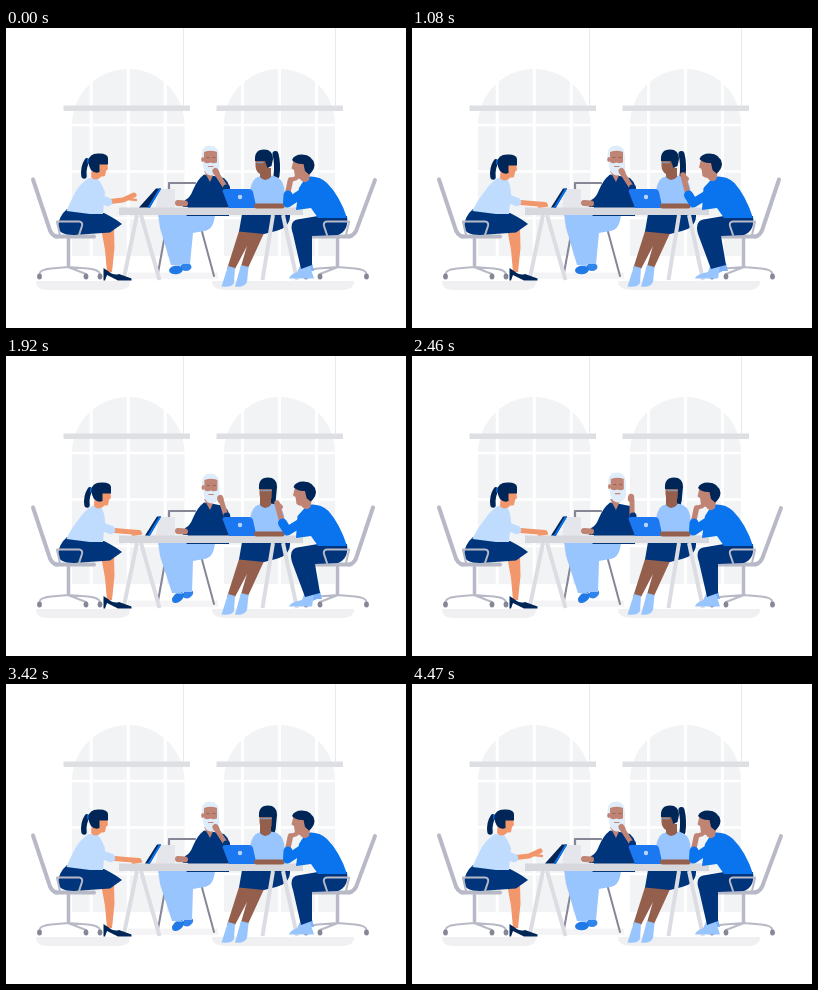
An HTML page with a canvas that plays this animation: 400x300 px, repeating every 4500 ms.

```html
<!DOCTYPE html>
<html lang="en">
<head>
<meta charset="utf-8">
<title>Team meeting</title>
<style>
html, body { margin: 0; width: 100%; height: 100%; overflow: hidden; background: #fff; }
canvas { display: block; }
</style>
</head>
<body>
<canvas id="stage" width="400" height="300"></canvas>
<script>
const ctx = document.getElementById('stage').getContext('2d');
const LOOP = 4500;
const HAIR = '#002657', NAVY = '#00357c', SKY = '#bfdcff', JEANS = '#99c5ff', BLUE = '#0a73ee',
  PEACH = '#f2976b', ROSE = '#c08474', BROWN = '#94604d', STEEL = '#b8b9c6', DARK = '#858797',
  PANE = '#f2f3f5', FLOOR = '#f0f0f2', TABLE = '#d7d8de', BEARD = '#dfecfa';

const fill = (d, color) => { ctx.fillStyle = color; ctx.fill(new Path2D(d)); };
const line = (d, width, color, cap = 'round') => {
  Object.assign(ctx, { lineWidth: width, strokeStyle: color, lineCap: cap, lineJoin: 'round' });
  ctx.stroke(new Path2D(d));
};
const dot = (x, y, rx, ry, color, turn = 0) => {
  ctx.fillStyle = color;
  ctx.beginPath();
  ctx.ellipse(x, y, rx, ry, turn, 0, 7);
  ctx.fill();
};
const group = (x, y, draw, turn = 0, px = 0, py = 0) => {
  ctx.save();
  ctx.translate(x + px, y + py);
  ctx.rotate(turn);
  ctx.translate(-px, -py);
  draw();
  ctx.restore();
};
const mirrored = draw => {
  ctx.save();
  ctx.translate(394, 0);
  ctx.scale(-1, 1);
  draw();
  ctx.restore();
};
const mix = (a, b, k) => a + (b - a) * k;
const ease = (t, from, to) => {
  const k = Math.min(1, Math.max(0, (t - from) / (to - from)));
  return k * k * (3 - 2 * k);
};
// 0 -> 1 during [a, b], back to 0 during [c, d]
const pulse = (t, a, b, c, d) => ease(t, a, b) - ease(t, c, d);

function drawWindow(left, right, shelf, cord) {
  const r = (right - left) / 2, mid = left + r;
  fill(`M${left} 228V${41 + r}A${r} ${r} 0 0 1 ${right} ${41 + r}V228Z`, PANE);
  for (const dx of [-37, 0, 37]) line(`M${mid + dx} 38V229`, 3, '#fff', 'butt');
  for (const y of [97, 143.5, 190]) line(`M${left} ${y}H${right}`, 2.5, '#fff', 'butt');
  fill(`M${shelf} 77.5h126.5v5.5h-126.5Z`, '#dedfe3');
  line(`M${cord} 0V78`, 1, '#e9eaed', 'butt');
}

function drawRoom() {
  drawWindow(66, 178.5, 57.5, 177.5);
  drawWindow(218, 329, 210.5, 329.5);
  fill('M122 244.500H212V251H122Z', '#f4f4f6');
  fill('M30 253H124Q124 262 112 262H42Q30 262 30 253Z', FLOOR);
  fill('M206 253H348Q348 262 336 262H220Q206 262 206 253Z', FLOOR);
}

function drawChair(tilt) {
  group(0, 0, () => line('M27 151.5L42.5 198Q45 208 51 208.5', 4, STEEL), tilt, 45, 208);
  line('M50 208.5H88', 4, STEEL);
  line('M62.5 210V238', 3.5, STEEL);
  line('M33.5 246Q34 241.5 45 240.5L62 239L82 240.5Q93 241.5 94 246M62 239L80 246', 2, STEEL);
  for (const x of [33.5, 80, 94]) dot(x, 248.5, 2.4, 3, DARK);
}

const drawArmrest = () => line('M51 193.5H73Q77 194 76 198L73 207M51 194L54 207', 2, STEEL);

function drawElder(t) {
  const away = pulse(t, 1600, 2250, 2750, 3300);
  const step = pulse(t, 1150, 1750, 3700, 4300);
  const nod = pulse(t, 2150, 2500, 2950, 3300) + 0.6 * pulse(t, 3810, 4000, 4100, 4320);
  line('M163 180V155H189', 2.2, DARK);
  line('M162 190L152 245M195 200L208 248', 2, DARK);
  // feet and legs
  const near = mix(170, 172, step), far = mix(180, 182, step);
  dot(far, mix(239, 238, step), 5.5, 4, '#3184ec', mix(0, -0.5, step));
  dot(near, mix(242, 241.5, step), 7, 4.3, '#2079e4', mix(-0.1, -0.7, step));
  fill(`M152 186H209Q208 202 198 203L187 205L${mix(184, 186, step)} 236H174.500L${mix(175, 177, step)} 238L${mix(165, 166, step)} 237L154 200Z`, JEANS);
  // torso
  fill('M198 146.500L208 148L218 150Q225 156 225 170L223 188H180.500L182 179H177L179 172Q184 170 187 162Q191 152 198 146.500Z', NAVY);
  fill('M198 143H209L204 154Z', ROSE);
  line('M179 175.5L172 175', 6, ROSE);
  // head
  group(mix(0, 0.8, away), -nod, () => {
    fill('M195.500 128Q195 117.500 204 117.500Q213 117.500 213 128V136H197Z', BEARD);
    fill('M198 124Q205 121.500 211 124V139H198Z', ROSE);
    dot(196.8, 131.5, 1.6, 2.6, ROSE);
    fill('M197 133Q200 136.500 204.500 134.500Q209 136.500 212.500 133L213.500 139Q212 147.500 205 147.500Q196.500 146.500 197 133Z', BEARD);
    line('M202.5 138.5H207', 1.2, ROSE);
    line('M201 129.5H203M207 129.5H209', 0.8, '#8a5a4e');
  });
  // raised arm
  const hx = mix(210, 219, away), hy = mix(144, 142, away);
  line(`M220 160L${hx + 1} ${hy + 2}`, 5, ROSE);
  dot(hx, hy, 3.2, 4.2, ROSE, mix(-0.5, 0.1, away));
  line(`M${mix(220.5, 221, away)} 160L221 172`, 7, NAVY);
}

function drawAnalyst(t) {
  const face = pulse(t, 1130, 1600, 3500, 4100);
  // legs and shoes
  fill('M233 203H259L242 240H234.500L241 218L229 241H221Z', BROWN);
  fill('M222 238L229 240L228 255Q225 260 215.500 258.500Z', JEANS);
  fill('M235 237L242.500 239L241 254Q238 260 229 258.500Z', JEANS);
  fill('M236 186H284Q285 199 270 203L258 206L233 203.500Z', NAVY);
  // head moves from profile to front; the ponytail slides behind it
  const x = mix(256, 260, face), tail = mix(270.5, 266, face);
  line(`M${tail - 1} 126Q${tail + 1.5} 136 ${tail} 148`, 6, HAIR);
  fill('M252 149Q259 146 268 148Q276 150 278 159L281 180H247L244 162Q246 151 252 149Z', JEANS);
  fill('M254 140H265V149Q259 155 254 149Z', BROWN);
  fill(`M${x - 6.5} 130H${x + 7}L${x + 6} 142Q${x + 3} 147 ${x - 2} 146Q${x - 6} 144 ${x - 6.5} 138Z`, BROWN);
  fill(`M${x - 7} 133Q${x - 8} 121.500 ${x + 2} 121.500Q${x + 11} 121.500 ${x + 11} 131L${x + 9.5} ${mix(138, 146, face)}L${x + 5.5} ${mix(140, 144, face)}L${x + mix(3, 6, face)} 133Z`, HAIR);
  line(`M${x - 5} 134.5H${x + mix(1, 5, face)}`, 1.5, '#8795b0');
}

function drawTable() {
  line('M131 187L117.500 252M135 187L153.500 252', 4, '#dcdde3', 'butt');
  line('M267 187L256.500 252M277 187L291 252', 4, '#dcdde3', 'butt');
  fill('M153 161H169V180H150Z', '#e5e6eb');
  fill('M113 179.500H297V187H113Z', TABLE);
}

function drawLaptop() {
  fill('M216.500 163Q216.500 161 219 161H241.500Q246 160.500 247 164L250.500 180H223Z', '#1b78f0');
  dot(234, 169, 2.2, 2.2, '#b7d7ff');
  line('M250.500 178H276', 5, BROWN);
}

function drawPresenter(t) {
  const work = pulse(t, 30, 580, 2800, 3400);
  const typing = pulse(t, 30, 560, 3400, 4000);
  const wave = (1 - typing) * Math.sin(t / LOOP * Math.PI * 8) * 0.5;
  const dx = mix(-3, 0, work), dy = mix(-1, 0, work);
  // tablet
  fill(`M${mix(133, 139, typing)} 179.500L${mix(150, 151, typing)} 160.500H155L144 179.500Z`, HAIR);
  line('M154 161L143 179', 2, BLUE);
  // leg, shoe, skirt
  fill('M95 200H108L108.500 220L106 244H101L99 222Z', PEACH);
  fill('M97.500 240L102 243Q108 248 113 246L125.500 250.500V252.500H112L101 247L99 252.500H97.500Z', HAIR);
  fill('M61 181L98 185Q110 191 116 196L104 204.500L68 207Q52 207 52 198Q53 188 61 181Z', NAVY);
  // torso
  fill(`M${86 + dx} 150H${94 + dx}Q${98 + dx} 154 99 164L97 186H84L60.500 183Q64 174 ${73 + dx} 163Q${79 + dx} 154 ${86 + dx} 150Z`, SKY);
  // head
  group(dx, dy, () => {
    line('M84 134Q80 140 81 149', 5.5, HAIR);
    line('M85 132V136', 1.5, BLUE);
    fill('M89 138H98V150Q92 155 88 150Z', PEACH);
    fill('M91 134H104L105 142L103 144L102 149Q96 151 91 146Z', PEACH);
    fill('M85.500 134Q86 126.500 95 126.500Q104.500 126 105 131V137.500H96.500V145Q92 147 88 143Q85.500 139 85.500 134Z', HAIR);
  });
  // arm
  const ex = mix(102, 105, typing), hx = mix(128, 133, typing), hy = mix(167, 176.5, typing) + wave;
  line(`M${ex - 2} 174L${mix(117, 120, typing)} ${mix(172, 175.5, typing)}L${hx} ${hy}`, 5, PEACH);
  line(`M${hx - 6} ${hy + mix(4, 2, typing)}L${hx + 2} ${hy + mix(5, 1, typing)}`, 2.5, PEACH);
  line(`M${89 + dx} 160L${ex - 8} 171L${ex} 174`, 8.5, SKY);
}

function drawListener(upright) {
  const x = mix(0, 1.5, upright);
  // legs and shoes; the shins slant back when upright
  const hem = mix(292, 296, upright), back = mix(306, 314, upright);
  fill(`M${back - 10} 235H${back}L${back + 2} 243H${back - 3}L${back - 18} 250Z`, '#7db2fb');
  fill(`M${hem + 2} 238H${hem + 12}L${mix(308, 306, upright)} 250.500H283Q284 246 ${hem} 244Z`, JEANS);
  fill(`M312 188H341Q343 203 332 207L${mix(306, 309, upright)} 208L${back} 237L${hem + 3} 241L${mix(287, 286, upright)} 206Q282 192 294 191Z`, NAVY);
  // torso
  fill(`M${300 + x} 149Q${312 + x} 147 ${321 + x} 155Q334 168 341 190H312L305 180L290 182L${293 - x} 160Z`, BLUE);
  // head
  group(x, -upright, () => {
    fill('M293 138L305 140L303 152Q298 157 294 151Z', ROSE);
    fill('M287.500 132H301V149Q294 153 289 149L288 142L285.500 140.500Z', ROSE);
    fill('M286 132Q288 126.500 296 126.500Q307 127 308.500 137Q308 143 303 146.500L299 143L297.500 136Q290 136.500 286 132Z', HAIR);
  });
  // arm
  const hx = mix(284.5, 271, upright), hy = mix(152, 147, upright);
  const wrist = mix(281.5, 276, upright);
  line(`M${wrist} 166L${hx} ${hy}`, 5.5, ROSE);
  line(`M${hx} ${hy}L${hx + mix(6, 4, upright)} ${hy + mix(-2, 4, upright)}`, 4, ROSE);
  line(`M${301 + x} 162L281.500 175L${wrist + 0.5} 167`, 9, BLUE);
}

function draw(t) {
  const upright = pulse(t, 60, 520, 1980, 2400);
  ctx.fillStyle = '#fff';
  ctx.fillRect(0, 0, 400, 300);
  drawRoom();
  drawElder(t);
  drawAnalyst(t);
  drawChair(0);
  mirrored(() => drawChair(mix(-0.035, 0, upright)));
  drawTable();
  drawLaptop();
  drawPresenter(t);
  drawListener(upright);
  drawArmrest();
  mirrored(drawArmrest);
}

function tick() {
  draw(performance.now() % LOOP);
  requestAnimationFrame(tick);
}
tick();
</script>
</body>
</html>
```
